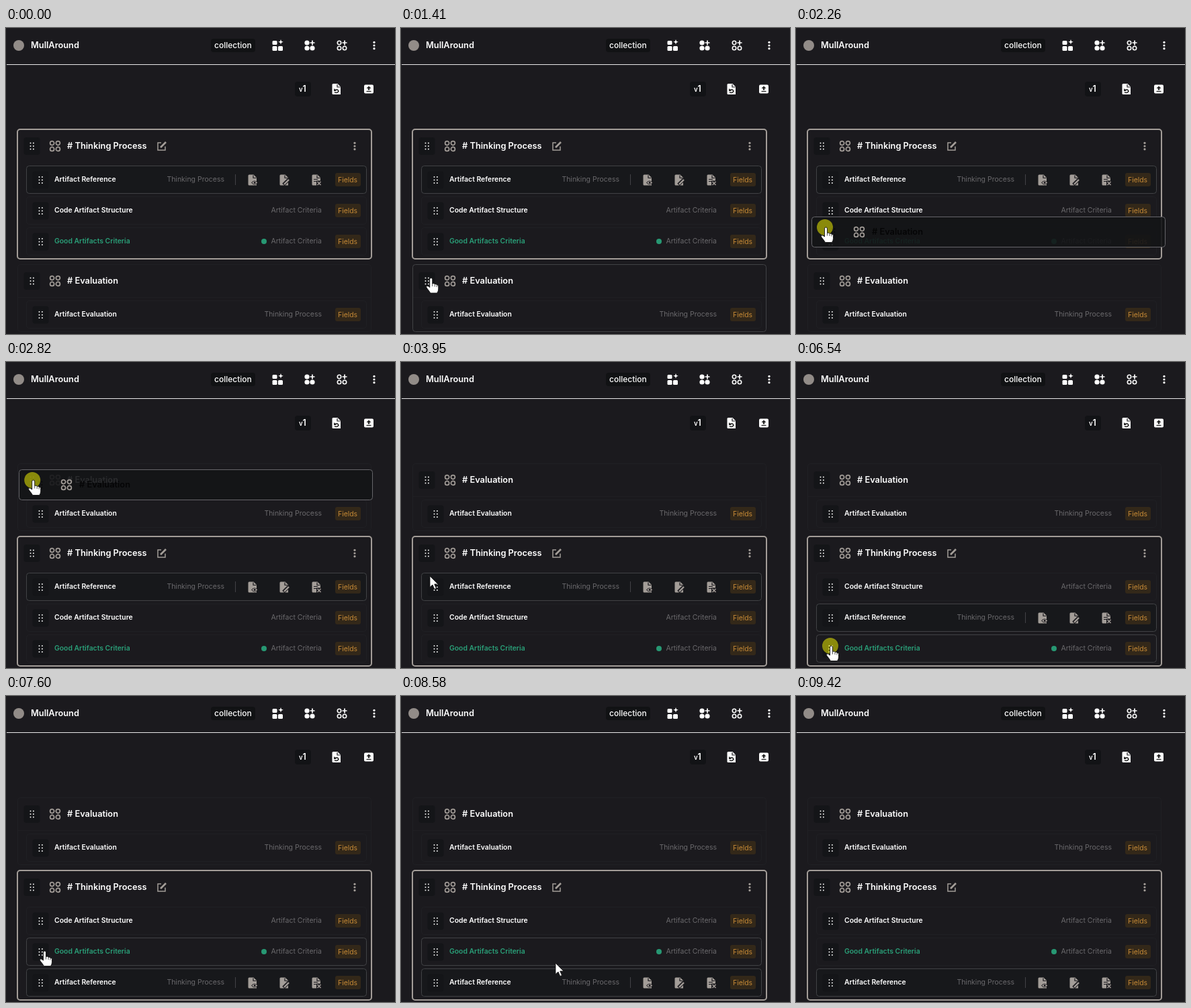
Animation, 579 px wide and 456 px high, one loop 9.92 s. Source, as an HTML page:

```html
<!DOCTYPE html>
<html lang="en">
<head>
<meta charset="utf-8">
<title>Collection editor</title>
<style>
  html, body { margin: 0; width: 100%; height: 100%; overflow: hidden; background: #1b1a1e; }
  svg { display: block; width: 579px; height: 456px; font-family: Inter, "Liberation Sans", sans-serif; }
  .title { font-size: 12.8px; font-weight: 600; fill: #fff; }
  .label { font-size: 10.4px; font-weight: 600; fill: #fff; }
  .meta { font-size: 10.5px; fill: #6a696c; text-anchor: end; }
</style>
</head>
<body>
<svg id="stage" viewBox="0 0 579 456"></svg>
<script>
const LOOP = 9920, STEP = 70;
const BG = '#1b1a1e', DARK = '#141518', GREY = '#a39d98', WHITE = '#fff';
const FAINT = '#202024', LINE = '#414245';

const at = (x, y, body, id = '') => `<g ${id && `id="${id}"`} transform="translate(${x} ${y})">${body}</g>`;
const text = (x, y, cls, str, extra = '') => `<text x="${x}" y="${y}" class="${cls}" ${extra}>${str}</text>`;
const box = (x, y, w, h, r, fill, extra = '') =>
  `<rect x="${x}" y="${y}" width="${w}" height="${h}" rx="${r}" fill="${fill}" ${extra}/>`;
const dot = (x, y, r, fill) => `<circle cx="${x}" cy="${y}" r="${r}" fill="${fill}"/>`;
const ring = (x, y, r, color, w) =>
  `<circle cx="${x}" cy="${y}" r="${r}" fill="none" stroke="${color}" stroke-width="${w}"/>`;
const stroke = (d, color, w = 1.5) => `<path d="${d}" fill="none" stroke="${color}" stroke-width="${w}"/>`;
const shape = (d, fill) => `<path d="${d}" fill="${fill}"/>`;

const corners = [[-1, -1], [1, -1], [-1, 1], [1, 1]];
const rings = (x, y) => at(x, y, corners.map(([i, j]) => ring(i * 4.4, j * 4.4, 3, GREY, 1.7)).join(''));
const gripDots = (x, y, color) =>
  at(x, y, [-4.5, 0, 4.5].map(j => dot(-2, j, 1, color) + dot(2.4, j, 1, color)).join(''));
const grip = (x, y) => box(x - 12, y - 13, 24, 26, 4, DARK) + gripDots(x, y, '#f0f0f0');
const more = (x, y, color) => at(x, y, [-4.7, 0, 4.7].map(j => dot(0, j, 1.6, color)).join(''));
const plus = (x, y) => stroke(`M${x - 3.5} ${y}h7M${x} ${y - 3.5}v7`, WHITE, 1.7);
const page = (x, y, color, mark) =>
  at(x, y, shape('M-5-8H1.5L6-3.5V8H-5Q-6.5 8-6.5 6.5V-6.5Q-6.5-8-5-8Z', color) +
    stroke('M1-7v4h4.5', BG, 1.2) + mark);

const eye = shape('M-2 4Q3-2 8 4Q3 10-2 4Z', BG) + shape('M-.8 4Q3-.5 7.2 4Q3 8.5-.8 4Z', GREY) + dot(3.2, 4, 1.4, BG);
const pencil = stroke('M-1 7L7-1', BG, 5) + stroke('M0 6.5L7-.5', GREY, 2.4);
const cross = box(0, 1, 8, 8, 0, BG) + stroke('M1.5 2.5l5 5m0-5l-5 5', GREY, 1.5) +
  stroke('M-4-1h6M-4 2h4', BG, 1.2);
const reload = stroke('M-3 4.5Q0 7 3 3.5Q2-.5-2.5 1.5', '#222', 1.5) + shape('M-4-1v4h4z', '#222');

function row(id, name, source, { tools = false, color = WHITE, status = false } = {}) {
  return at(0, 0,
    box(30.5, -20.5, 506, 41, 4, tools ? '#17181b' : 'none', `stroke="${FAINT}" class="edge"`) +
    grip(51.5, 0.5) + text(72, 3.3, 'label', name, `style="fill:${color}"`) +
    text(tools ? 325 : 470, 3.3, 'meta', source) +
    (status ? dot(384, 0, 4, '#279873') : '') +
    (tools ? stroke('M341.5-8v16', '#434246', 1) +
      page(367, 0.5, GREY, eye) + page(414, 0.5, GREY, pencil) + page(462, 0.5, GREY, cross) : '') +
    box(490, -10, 38, 20, 3, '#332819') + text(494, 3.5, '', 'Fields', 'font-size="10.4" fill="#c58936"'), id);
}

const groupHead = name => grip(38.5, 25) + rings(73, 25) + text(91, 29, 'title', name);

function toolbar() {
  const sparkle = shape('M409 17l1 2.8 2.8 1-2.8 1-1 2.8-1-2.8-2.8-1 2.8-1z', WHITE);
  return dot(19, 26, 8, '#928c88') + text(37, 30, 'title', 'MullAround') +
    box(305, 16, 66, 20, 4, '#111214') +
    text(310, 30.2, '', 'collection', 'font-size="12" font-weight="500" fill="#fff"') +
    box(396.5, 19, 7, 6, 1.5, WHITE) + box(396.5, 27, 7, 7, 1.5, WHITE) + box(405, 27, 7, 7, 1.5, WHITE) + sparkle +
    dot(448, 22, 3.6, WHITE) + dot(448, 30, 3.6, WHITE) + dot(456, 30, 3.6, WHITE) + plus(456, 22) +
    ring(496, 22, 2.7, WHITE, 1.6) + ring(496, 30, 2.7, WHITE, 1.6) + ring(504, 30, 2.7, WHITE, 1.6) + plus(504, 22) +
    more(548, 26, WHITE) + box(1, 54, 578, 1, 0, '#e8e8e8') +
    box(430, 80, 24, 22, 4, '#121316') +
    text(436, 95, '', 'v', 'font-size="9.5" font-weight="600" fill="#fff"') +
    text(441.5, 95, '', '1', 'font-size="12.5" font-weight="600" fill="#fff"') +
    page(492, 91, WHITE, reload) + box(533, 84.5, 14, 13, 2, WHITE) +
    shape('M540 86.5l3.5 3.5h-2.3v2.5h-2.4v-2.5h-2.3z', '#222') + stroke('M536.5 94.5h7', '#222', 1.3);
}

const editIcon = stroke('M231 171h-5v11h11v-5.5', GREY, 1.5) + stroke('M230 178L238 170', GREY, 2.6);

const $ = id => document.getElementById(id);
const handPath = 'M-2 1.5Q-2-.5 0-.5T2 1.5V8Q5 6.500 5.500 9Q8 7.500 8.500 10Q11 9 11 12V16Q11 19 9 22H-1' +
  'Q-3 18.500-6 15Q-8 12.500-6.500 11.500Q-5 10.500-2 13.500Z';

$('stage').innerHTML = box(0, 0, 579, 456, 0, BG) + toolbar() +
  at(0, 0,
    box(17.5, 0.5, 526, 100, 4, 'none', `stroke="${FAINT}" class="edge"`) +
    stroke('M18 49.500H543', '#1f1f22', 1) + groupHead('# Evaluation') +
    row('evaluationRow', 'Artifact Evaluation', 'Thinking Process'), 'evaluation') +
  at(0, 0,
    box(17, 0, 527, 193, 4, 'none', `stroke="${GREY}" stroke-width="2"`) +
    groupHead('# Thinking Process') + at(0, -1, editIcon.replace(/.*/, s => at(0, -150, s))) + more(519, 25, GREY) +
    row('reference', 'Artifact Reference', 'Thinking Process', { tools: true }) +
    row('structure', 'Code Artifact Structure', 'Artifact Criteria') +
    row('criteria', 'Good Artifacts Criteria', 'Artifact Criteria', { color: '#2a9f78', status: true }), 'thinking') +
  at(0, 0,
    box(0.5, 0.5, 506, 45, 4, '#131417', 'id="ghostBox" fill-opacity=".9" stroke="#66656a"') +
    gripDots(32, 23, '#08080a') + `<g id="ghostIcon">${rings(71, 23)}</g>` +
    text(0, 27, 'title', '', 'id="ghostText" style="fill:#050506"'), 'ghost') +
  at(0, 0,
    `<circle id="press" r="12" fill="#ff0" fill-opacity=".5"/>` +
    `<path id="arrow" d="M0 0V16.500L4 13L6.800 19.500L9.500 18.300L6.700 12H12Z" fill="#fff" stroke="#111" stroke-width=".8"/>` +
    `<g id="hand" transform="translate(1.5 .5)"><path d="${handPath}" fill="#fff" stroke="#111" stroke-width=".9"/>` +
    stroke('M2 8v4M5.500 9.500v3M8.500 10.500v2.500', '#222', 0.8) + '</g>', 'cursor');

// Pointer path: time, x, y. Movement advances in fixed steps from each start.
const starts = [0, 780, 1910, 3320, 4860, 5770, 7100, 7600, 7880];
const path = [
  [780, 170, 448], [1000, 110, 410], [1200, 62, 383], [1480, 37, 369],
  [1910, 37, 369], [2260, 43, 297], [2540, 44, 236], [2890, 38, 161],
  [3320, 38, 166], [3600, 40, 255], [3950, 43, 319], [4300, 48, 337], [4650, 51, 381],
  [4860, 51, 380], [5140, 52, 361], [5490, 57, 327],
  [5770, 57, 329], [6050, 54, 374], [6400, 51, 423],
  [6540, 51, 423], [6750, 47, 392], [6820, 48, 380], [6960, 50, 368],
  [7099, 50, 368], [7100, 56, 380], [7600, 56, 380], [7740, 56, 381],
  [7880, 58, 383], [8230, 110, 424], [8580, 230, 398], [8860, 380, 345], [9070, 455, 350], [9350, 537, 450]
];

const drags = [
  { press: 1910, from: 1910, to: 2960, dx: 20, dy: 16, width: 526, item: 'evaluation', name: '# Evaluation', textX: 90 },
  { press: 4860, from: 4930, to: 5770, dx: 21, dy: 19, width: 505, item: 'structure', name: 'Code Artifact Structure', textX: 61 },
  { press: 6480, from: 6610, to: 7100, dx: 21, dy: 17, width: 505, item: 'criteria', name: 'Good Artifacts Criteria', textX: 61 }
];

function pointer(t) {
  const start = starts.filter(s => s <= t).pop();
  const time = start + Math.floor((t - start) / STEP) * STEP;
  const i = path.findIndex(p => p[0] > time);
  if (i < 0) return path[path.length - 1].slice(1);
  if (i === 0) return path[0].slice(1);
  const [a, b] = [path[i - 1], path[i]];
  const k = (time - a[0]) / (b[0] - a[0]);
  return [a[1] + (b[1] - a[1]) * k, a[2] + (b[2] - a[2]) * k];
}

const move = (id, x, y) => $(id).setAttribute('transform', `translate(${x} ${y})`);
const show = (id, on) => $(id).setAttribute('visibility', on ? 'visible' : 'hidden');
const edge = (id, on) => $(id).querySelector('.edge').setAttribute('stroke', on ? LINE : FAINT);

function rowOrder(t) {
  if (t < 5420) return ['reference', 'structure', 'criteria'];
  if (t < 6820) return ['structure', 'reference', 'criteria'];
  return ['structure', 'criteria', 'reference'];
}

function render(t) {
  const [x, y] = pointer(t);
  const visible = t >= 780 && t < 9420;
  const drag = drags.find(d => t >= d.press && t < d.to);
  const dragging = drag && t >= drag.from;
  const moved = t >= 2470;
  const evaluationY = moved ? 151 : 352, thinkingY = moved ? 260 : 151;
  move('evaluation', 0, evaluationY);
  move('thinking', 0, thinkingY);

  let overGrip = Math.abs(x - 38.5) < 12 &&
    [evaluationY, thinkingY].some(top => Math.abs(y - top - 25) < 13);
  const placeRow = (id, groupY, rowY) => {
    move(id, 0, rowY);
    const offset = Math.abs(y - groupY - rowY);
    const over = visible && !dragging && offset < 21 && x > 30 && x < 537;
    edge(id, id === 'reference' || over || (drag && drag.item === id));
    if (over && offset < 13 && Math.abs(x - 51.5) < 12) overGrip = true;
  };
  placeRow('evaluationRow', evaluationY, 75);
  rowOrder(t).forEach((id, i) => placeRow(id, thinkingY, 75 + 46 * i));
  edge('evaluation', visible && !dragging && y > evaluationY && y < evaluationY + 101);

  show('ghost', dragging);
  show('ghostIcon', dragging && drag.item === 'evaluation');
  if (dragging) {
    move('ghost', Math.round(x - drag.dx), Math.round(y - drag.dy));
    $('ghostBox').setAttribute('width', drag.width);
    $('ghostText').setAttribute('x', drag.textX);
    $('ghostText').textContent = drag.name;
  }

  move('cursor', x, y);
  const hand = drag || overGrip;
  show('press', visible && drag);
  show('hand', visible && hand);
  show('arrow', visible && !hand);
}

const begin = performance.now();
function frame() {
  render((performance.now() - begin) % LOOP);
  requestAnimationFrame(frame);
}
render(0);
requestAnimationFrame(frame);
</script>
</body>
</html>
```
